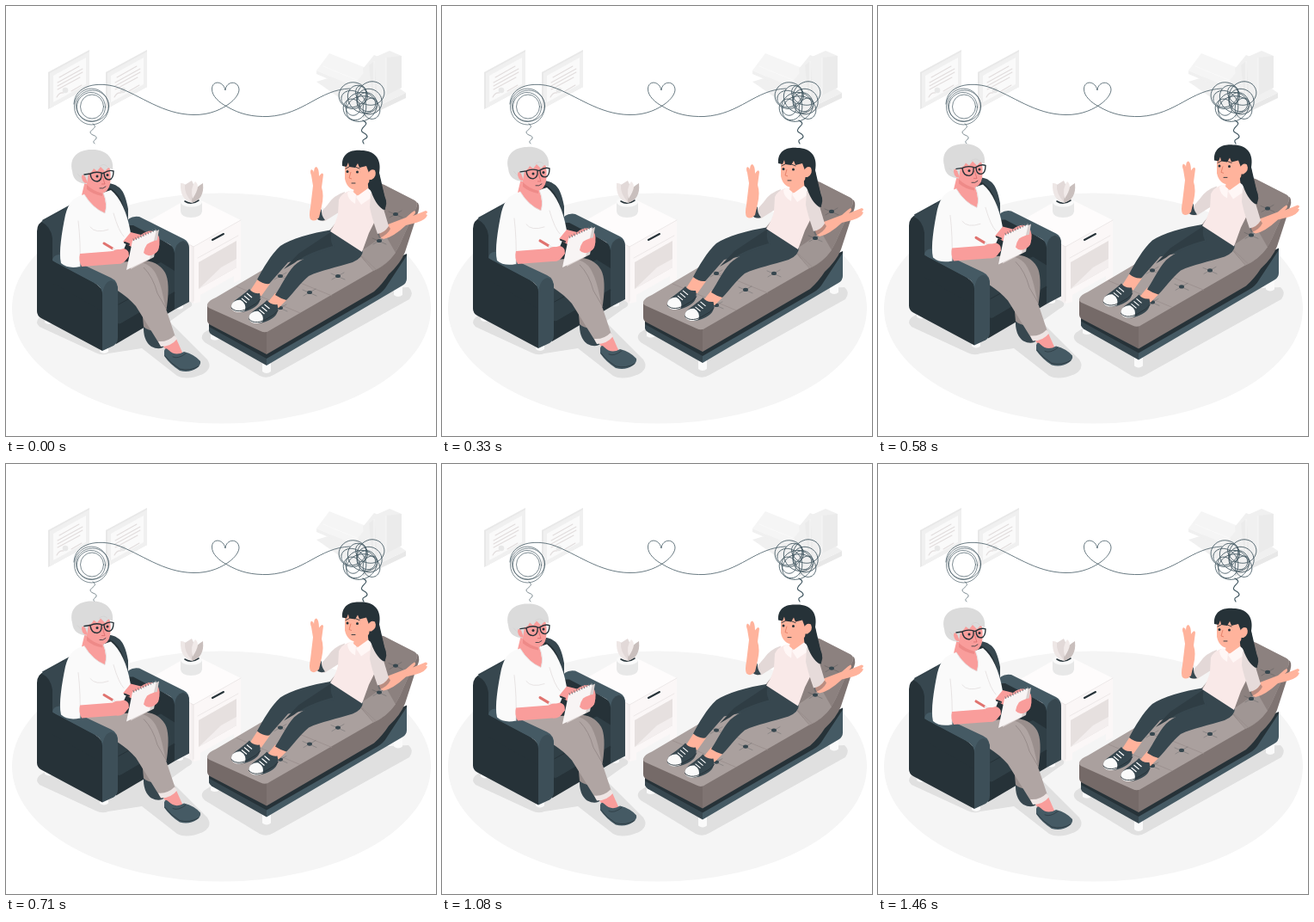
An HTML page for the animation above (1500 ms loop, 500 px wide and 500 px high).

```html
<!DOCTYPE html>
<html lang="en">
<head>
<meta charset="utf-8">
<title>Therapy session</title>
<style>
html, body { margin: 0; height: 100%; overflow: hidden; background: #fff; }
svg { display: block; width: 100vw; height: 100vh; }
.dark { fill: #263238; } .mid { fill: #37474f; } .slate { fill: #455a64; }
.taupe { fill: #b0a5a3; } .brown { fill: #7f7472; } .white { fill: #fafafa; }
.pale { fill: #f0f0f0; } .grey { fill: #e0e0e0; } .soft { fill: #e8e8e8; }
.rose { fill: #f99d9b; } .peach { fill: #ffb39c; } .blouse { fill: #f9e9e8; }
.line { fill: none; stroke: #263238; stroke-linecap: round; stroke-linejoin: round; }
.crease { fill: none; stroke: #e2dddd; stroke-linecap: round; }
</style>
</head>
<body>
<svg viewBox="0 0 500 500">
  <defs>
    <g id="diploma">
      <path class="soft" d="M49 77L97 51V94L49 120Z"/>
      <path class="pale" d="M51 78L97 53V94L51 119Z"/>
      <path class="white" d="M55 81L93 60V91L55 112Z"/>
      <path class="crease" d="M62 83L85 70M60 89L89 73M60 93L89 77M60 97L86 83M76 99L88 92M59 106Q62 100 67 101" stroke-width="1.1"/>
      <circle cx="69" cy="98" r="3.3" class="soft"/>
    </g>
    <g id="button">
      <path class="line" d="M-8 -3L8 4M-7 4L7 -4" stroke-width=".5" opacity=".45"/>
      <ellipse rx="3" ry="2.1" class="mid"/>
    </g>
    <g id="sneaker">
      <path class="mid" d="M262 349C263 342 273 339 283 329Q287 335 295 334C298 345 291 350 284 353C274 358 262 357 262 349Z"/>
      <path class="white" d="M262 349C262 344 269 341 273 342Q280 346 278 354C270 358 262 356 262 349Z"/>
      <path d="M262 351C267 357 276 355 284 350Q291 347 296 341" class="line" stroke-width=".9"/>
      <path d="M274 340L280 345M277 337L283 342M280 334L286 339" fill="none" stroke="#fff" stroke-width="1.2"/>
    </g>
  </defs>

  <ellipse cx="250.500" cy="351.500" rx="243.500" ry="134" fill="#f5f5f5"/>

  <use href="#diploma"/>
  <use href="#diploma" x="67"/>

  <!-- shelf -->
  <path class="pale" d="M361 88L420 70L465 101L414 125Z"/>
  <path class="soft" d="M465 101V107L415 131V125Z"/>
  <path fill="#f5f5f5" d="M361 75L376 55L421 73L403 93Z"/>
  <path class="pale" d="M361 75L403 93V97L361 79ZM403 93L421 73V77L403 97Z"/>
  <path class="pale" d="M415 73L428 57L441 62V104L420 108Z"/>
  <path fill="#ebebeb" d="M422 69L440 55V105L426 109Z"/>
  <path class="pale" d="M428 60L446 52L460 58V95L432 107Z"/>
  <path fill="#ebebeb" d="M442 60L460 58V95L442 104Z"/>
  <path fill="none" stroke="#fafafa" stroke-width=".8" d="M428 64V105M442 60V103M369 70L410 87"/>

  <!-- floor shadows -->
  <path class="grey" d="M39 362L118 315L214 343Q220 348 211 352L190 367L234 411Q241 421 229 428Q210 436 199 430L158 398L119 404Q112 407 104 403L39 373Q33 368 39 362Z"/>
  <path class="grey" d="M230 380L300 335L468 327Q475 333 469 341L311 429Q303 434 295 430L231 391Q225 386 230 380Z"/>

  <!-- side table -->
  <path fill="#f5f0f0" d="M166 250L218 279V346L213 343V338L166 310Z"/>
  <path fill="#fbf7f7" d="M218 279L273 249V318L265 322V314L226 336V344L218 346Z"/>
  <path fill="#fefcfc" d="M166 250L217 221L273 249L218 280Z"/>
  <path fill="#e6e0df" d="M224 298L268 273V304L224 329Z"/>
  <path fill="#f3eeee" d="M224 329L250 304L268 294V304Z"/>
  <path class="crease" d="M166 250L218 280L273 249M218 280V343M223 293L270 267" stroke-width=".6"/>
  <path class="line" d="M240 272L253 265" stroke-width="2"/>

  <!-- plant -->
  <path class="soft" d="M203 228V239Q204 246 215 246Q227 246 228 239V228Z"/>
  <ellipse cx="215.500" cy="228" rx="12.500" ry="5.500" class="white"/>
  <path class="line" d="M208 227Q215 232 224 226" stroke-width="1.600"/>
  <path fill="#eee7e6" d="M203 206Q215 206 217 229Q202 226 203 206Z"/>
  <path fill="#e2d9d8" d="M216 203Q223 214 216 228Q207 218 208 208Z"/>
  <path fill="#c9bfbd" d="M229 206Q231 225 216 229Q216 213 229 206Z"/>
  <path fill="#f1eae9" d="M220 204Q227 209 217 224Q214 212 220 204Z"/>

  <!-- thread -->
  <g class="line" style="stroke:#455a64" stroke-width=".8">
    <path d="M79 114C80 91 108 88 128 94C157 104 182 126 218 126.500C238 127 252 119 259 114C267 108 271 102 271 97C270 86 256 87 255 98C253 87 240 86 239.500 96C239 105 249 113 257 117C272 126 287 129 305 128.500C347 126 364 97 400 96"/>
    <g stroke-width=".7">
      <ellipse cx="99.500" cy="117" rx="20" ry="21"/>
      <ellipse cx="100.500" cy="116" rx="19" ry="18"/>
      <ellipse cx="99" cy="117.500" rx="16.500" ry="17"/>
      <ellipse cx="100" cy="117" rx="13.500" ry="14"/>
      <path d="M101 137C108 141 98 144 98 147C99 151 106 150 105 154C103 157 100 157 103 160"/>
    </g>
    <path id="tangle" stroke-width=".900"/>
    <path d="M415 133C423 137 416 139 414 143C411 148 420 147 420 152C419 156 412 154 416 160" stroke-width="1.200"/>
  </g>

  <g id="float">
    <!-- armchair -->
    <path class="white" d="M45 358H55V368Q50 372 45 368ZM109 395H119V402Q114 406 109 402ZM197 344H206V351Q201 354 197 351Z"/>
    <path class="mid" d="M42 249L73 232L105 211Q119 202 130 210Q138 214 142 236V290L75 315Z"/>
    <path class="dark" d="M96 214Q115 204 127 216Q136 224 139 244V292L90 300Z"/>
    <path class="dark" d="M137 257Q136 250 148 251L196 281V352L137 320Z"/>
    <path class="slate" d="M138 255Q142 243 155 245L207 271Q213 274 213 282L196 287Q195 279 188 276L148 255Z"/>
    <path class="mid" d="M196 287Q197 275 206 273Q213 275 213 283V344L196 353Z"/>
    <path class="dark" d="M126 320L196 300V353L128 393Z"/>
    <path fill="#303f46" d="M126 322L180 298L196 308V332L134 369Q128 371 128 364Z"/>
    <path class="line" d="M131 347L160 331M131 371L196 334" stroke-width="1"/>

    <!-- seated therapist -->
    <path class="mid" d="M160 371L174 373L185 395Q179 401 169 396Q159 389 160 371Z"/>
    <path fill="#9a8f8d" d="M140 298Q173 290 185 310Q191 321 187 350L179 376Q168 380 160 373L157 340Z"/>
    <path class="rose" d="M182 394L198 387L206 405L191 408Z"/>
    <path class="taupe" d="M84 301L145 297Q166 296 174 311C182 326 184 347 187 355L197 385Q191 394 179 394L151 349C139 335 123 326 100 314Z"/>
    <path fill="#eee5e4" d="M177 390Q188 391 196 383L199 387Q192 396 180 396Z"/>
    <path fill="none" stroke="#918684" stroke-width=".8" d="M160 304Q171 315 176 334L187 353"/>
    <path class="slate" d="M184 401Q185 396 189 400Q197 408 207 402Q219 405 226 413Q227 417 222 421Q213 427 202 424Q191 417 184 407Z"/>
    <path class="line" d="M185 407Q192 416 202 422Q214 425 224 419" stroke-width=".7"/>
    <path class="line" d="M194 408Q200 411 209 404" stroke-width=".6"/>

    <!-- near chair arm -->
    <path class="dark" d="M36 262Q36 252 45 249L67 236V290L112 330V401L41 363Q36 360 36 355Z"/>
    <path class="mid" d="M41 251L66 237Q70 238 70 242L64 290L54 298V270Q52 256 41 251Z"/>
    <path class="slate" d="M54 297Q54 288 65 289L88 300L122 316Q131 320 130 332L112 336Q112 327 104 323L61 300Q55 297 54 297Z"/>
    <path fill="#3d4f58" d="M112 336Q114 320 123 319Q130 321 130 331V386Q130 392 125 395L112 401Z"/>
    <path class="dark" d="M54 296L60 300L104 323Q112 327 112 338V355L54 322Z"/>

    <!-- shirt, arms and notebook -->
    <path class="rose" d="M93 199L113 207L112 215L116 222V243L100 239L88 220Z"/>
    <path class="white" d="M91 219C79 222 73 228 69 243C65 263 61 286 64 299Q72 306 86 303L87 293L137 283L145 264C141 240 133 223 122 214L113 217Q118 231 115 241Q102 236 91 219Z"/>
    <path class="crease" d="M91 219Q99 234 115 241Q119 230 113 217M84 250Q87 275 86 303M98 257Q104 265 119 260M125 241Q131 262 137 268" stroke-width=".8"/>
    <path class="rose" d="M86 288L125 285L137 282Q146 285 141 293Q137 301 128 300L88 303Q84 296 86 288Z"/>
    <path class="rose" d="M136 274L145 263L157 266Q168 258 175 264Q181 270 177 284Q173 290 163 289L144 279Z"/>
    <path class="line" d="M138 275L143 277" stroke-width="2"/>
    <path fill="#d9d0cf" d="M149 274L178 260L172 292L145 306Z"/>
    <path fill="#f8f4f4" d="M147 273L175 260L167 294L140 307Z"/>
    <path fill="none" stroke="#6b7479" stroke-width="3" stroke-dasharray=".8 2.300" d="M148 272L176 259"/>
    <path class="rose" d="M164 277Q174 271 178 273Q179 284 173 288Q165 293 160 287Q161 281 164 277Z"/>
    <path fill="none" stroke="#e0736f" stroke-width="3" stroke-linecap="round" d="M114 276L124 282"/>
    <path fill="none" stroke="#eee" stroke-width="2.400" d="M124 282L139 290"/>
    <path class="rose" d="M122 287Q128 281 135 284Q143 287 143 291Q138 298 129 297Z"/>

    <!-- therapist head -->
    <path class="rose" d="M91 188L119 183Q123 194 121 207Q119 217 110 218Q97 217 91 203Z"/>
    <path fill="#ee8a88" d="M94 208Q101 215 112 218L112 221Q101 219 94 213Z"/>
    <path fill="#dbdbdb" d="M77 192C73 176 84 167 99 167C115 166 126 176 124 190L119 188L115 192L110 187L106 192L102 189Q99 195 96 194L94 207C84 206 78 202 77 192Z"/>
    <path fill="none" stroke="#cfcfcf" stroke-width=".6" d="M108 187Q114 182 118 187M83 195Q88 202 94 203"/>
    <path class="rose" d="M92 198Q88 194 88 199Q89 207 95 206Z"/>
    <path class="line" stroke-width="1.400" d="M91 196L98 195Q104 192 111 194Q112 203 106 204Q99 204 98 195M111 195L114 194Q120 190 125 192Q125 201 120 202Q114 202 114 194"/>
    <path class="line" d="M109 212Q113 213 116 210" stroke-width=".8"/>
    <circle cx="106" cy="198" r="1.500" class="dark"/><circle cx="118" cy="196.500" r="1.500" class="dark"/>
    <path fill="none" stroke="#d86c6c" stroke-width=".8" d="M112 198L115 207L111 207"/>

    <!-- couch -->
    <path class="white" d="M238 379H248V387Q243 390 238 387ZM298 415H308V425Q303 429 298 425ZM451 326H461V336Q456 340 451 336Z"/>
    <path class="dark" d="M236 365L303 400L440 300L466 288V316L303 416L236 378Z"/>
    <path class="mid" d="M236 373L303 410V418L239 382Q236 380 236 377Z"/>
    <path class="slate" d="M303 410L432 336Q439 332 443 325L466 290V317Q466 322 461 325L303 418Z"/>
    <path class="brown" d="M302 379L412 314Q437 302 448 282L468 236Q473 226 479 229Q482 234 478 243L464 286Q459 299 445 312Q438 323 428 332L303 405Z"/>
    <path fill="#756a68" d="M234 348L303 377V405L238 371Q234 369 234 365Z"/>
    <path fill="#aaa09e" d="M234 347Q236 342 244 339L300 306L372 266L414 215Q424 204 439 208L475 226Q481 229 476 237L458 277Q447 300 427 308L307 377Q302 381 296 378L238 352Q233 350 234 347Z"/>
    <path fill="#8c817f" d="M425 206Q432 204 440 208L475 226Q480 229 476 237L458 277Q447 300 427 308L409 287Z"/>
    <path fill="#a09694" d="M410 287L441 266L453 287Q443 301 427 308Z"/>
    <path fill="none" stroke="#978c8a" stroke-width=".7" d="M268 326L342 357M303 306L379 337M411 288L430 306"/>
    <use href="#button" x="319" y="314"/><use href="#button" x="353" y="333"/>
    <use href="#button" x="386" y="314"/><use href="#button" x="319" y="351"/>
    <use href="#button" x="434" y="273"/><use href="#button" x="453" y="242"/>

    <!-- reclining patient -->
    <path class="peach" d="M293 317L307 323L297 337Q289 337 284 331ZM313 334L327 341L317 351Q309 351 304 345Z"/>
    <use href="#sneaker"/>
    <use href="#sneaker" x="20.500" y="13"/>
    <path class="mid" d="M380 260C354 264 331 271 319 279C308 289 299 305 292 318Q299 324 306 323L328 298L394 285Z"/>
    <path fill="#2f3d44" d="M379 262Q376 271 380 279Q350 287 335 299L323 306L340 288Z"/>
    <path class="mid" d="M378 262L415 284Q415 293 403 298C385 304 366 307 352 314C341 323 335 333 326 342Q319 340 313 336C321 324 326 312 335 302Q349 289 383 281Z"/>
    <path class="dark" d="M419 190L433 187C434 206 443 222 441 237Q430 235 421 216Z"/>
    <path fill="#e3d8d7" d="M394 216Q381 220 374 231L361 246Q364 251 371 250L390 238Z"/>
    <path class="mid" d="M367 236L361 246Q363 251 371 249Q366 243 367 236Z"/>
    <path class="peach" d="M357 209L355 197Q353 192 355 190Q358 191 358 194Q358 187 361 187Q364 189 364 198Q368 192 369 196L367 211Q370 220 367 233L364 246Q359 252 354 248Q352 244 354 234Z"/>
    <path class="blouse" d="M399 215Q390 218 387 225L386 242Q383 254 377 262L414 286L422 264L431 246L434 225Q430 216 420 214Z"/>
    <path class="peach" d="M405 207L420 201L422 217Q414 224 404 218Z"/>
    <path fill="#fff7f6" d="M401 214L407 219L406 230Q397 225 397 217ZM407 222L421 212Q427 216 426 222L413 231Z"/>
    <path class="peach" d="M434 259L444 254L465 246L472 240L475 238Q478 240 473 244L488 238Q492 239 488 242L490 243Q488 249 477 252L465 255Q450 269 439 271Q433 270 434 259Z"/>
    <path fill="#e6dbda" d="M424 218Q432 218 436 226L445 256Q440 264 432 265Q425 245 423 234Z"/>
    <path class="mid" d="M445 256Q440 264 432 265L434 270Q444 266 447 259Z" opacity=".35"/>

    <!-- patient head -->
    <path class="peach" d="M394 181L421 180L424 200Q421 212 408 214Q397 214 394 201Z"/>
    <path class="dark" d="M391 186C390 170 403 167 413 168C429 168 437 178 434 194L440 220Q445 232 439 237Q429 231 423 211L422 194L419 186L411 188L409 183L406 188L399 187L398 182L396 187Z"/>
    <path class="peach" d="M420 196Q424 188 429 191Q432 198 425 202L420 202Z"/>
    <path class="line" d="M395 189L399 187M406 187L411 189M402 206L406 206" stroke-width=".9"/>
    <circle cx="397" cy="192.500" r="1.500" class="dark"/><circle cx="408.500" cy="193" r="1.500" class="dark"/>
    <path fill="none" stroke="#e0765f" stroke-width=".8" d="M401 193L399 200L402 201"/>
  </g>
</svg>
<script>
const LOOP = 1500, FPS = 24, RISE = 7.5;
const float = document.getElementById('float');

// Loops of changing size whose centre wanders around the middle of the knot.
const knot = Array.from({ length: 501 }, (_, i) => {
  const a = i / 500 * 2 * Math.PI, b = a * 11 + 1;
  const size = 13 + 3 * Math.sin(a * 4);
  const x = 413.5 + 12 * Math.cos(a * 3) + size * Math.cos(b);
  const y = 111 + 9 * Math.sin(a * 2) + size * Math.sin(b);
  return x.toFixed(1) + ' ' + y.toFixed(1);
});
document.getElementById('tangle').setAttribute('d', 'M' + knot.join('L'));

function draw() {
  const step = Math.floor((performance.now() % LOOP + 5) * FPS / 1000);
  const phase = step * 1000 / FPS / LOOP;
  const lift = RISE * (1 - Math.cos(phase * 2 * Math.PI)) / 2;
  float.setAttribute('transform', `translate(0 ${-lift})`);
  requestAnimationFrame(draw);
}
draw();
</script>
</body>
</html>
```
